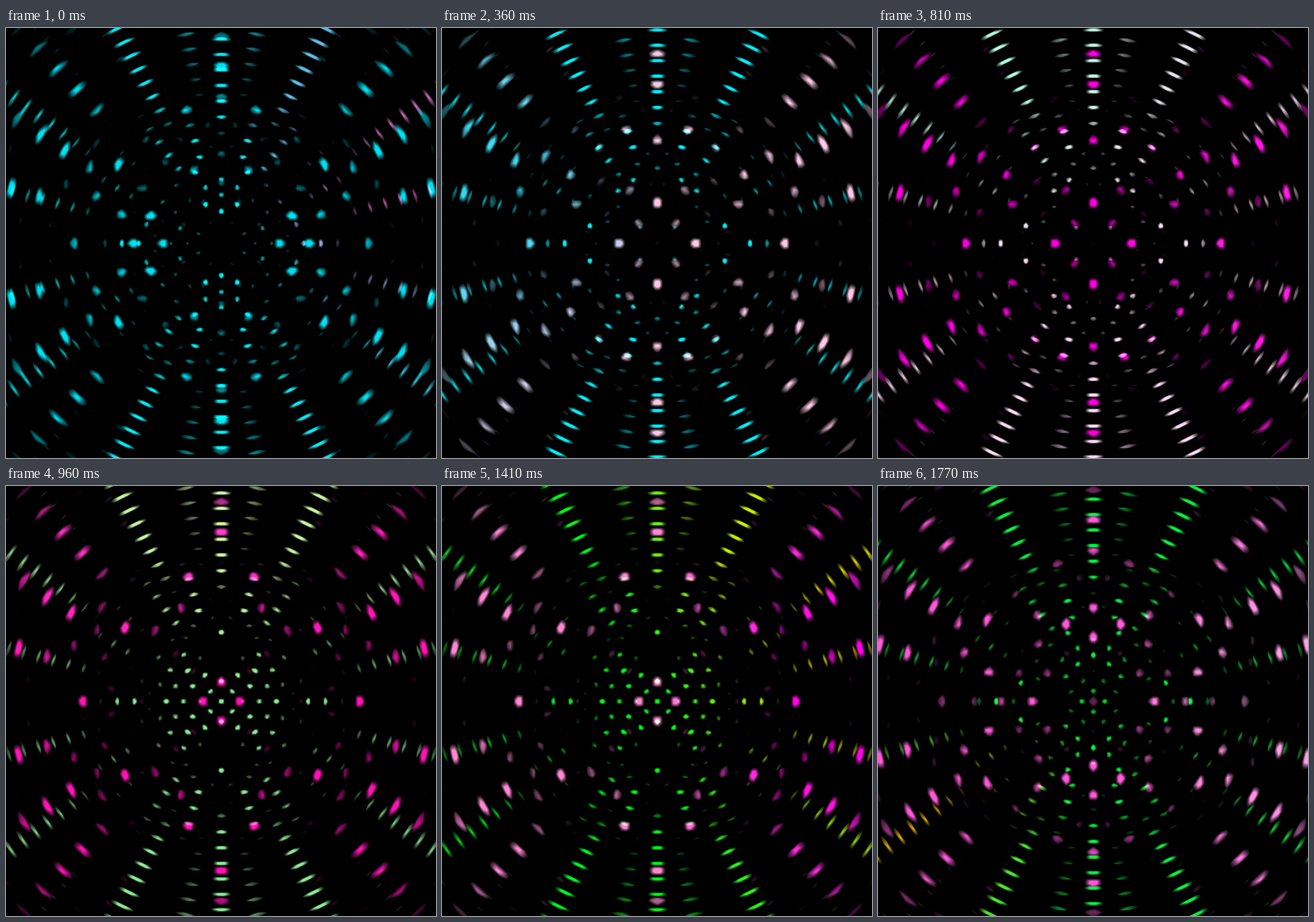
Animation, 600 px wide and 600 px high, one loop 1800 ms. Source, as an HTML page with a canvas:

```html
<!DOCTYPE html>
<html>
<head>
<meta charset="utf-8">
<style>
  html, body { margin: 0; height: 100%; overflow: hidden; background: #000; }
  canvas { display: block; width: 100vw; height: 100vh; }
</style>
</head>
<body>
<canvas id="stage" width="600" height="600"></canvas>
<script>
const SIZE = 600, MID = 300, LOOP = 1800, STEP = 30, PERIOD = 225;
const DARK = 0.22, FULL = 0.56; // ring product mapped to black and to full colour
const ctx = document.getElementById('stage').getContext('2d');
const image = ctx.createImageData(SIZE, SIZE);
const data = image.data;

// Each layer multiplies the rings of four sources at (±a, ±b).
// dir 1 runs inward, -1 outward.
// Keys: time, base colour, accent colour, accent angle, accent narrowness.
const layers = [
  { a: 112.2, b: 105.6, wave: 37.5, dir: 1, phase: 0.86, keys: [
    [0, '00e0f0', '00e0f0', 0, 2],
    [360, 'ffc8e6', '30d8f0', 165, 2],
    [630, '00e6ec', '00e6ec', 90, 2],
    [810, 'ff00e0', 'ff20e0', 0, 2],
    [1140, 'ff2c80', 'ff60b0', 225, 2],
    [1410, 'ff88d4', 'ff00e4', 0, 1],
    [1770, 'ff58d8', 'ffa4e8', 0, 2]] },
  { a: 59.5, b: 65.1, wave: 20.86, dir: -1, phase: 0.975, keys: [
    [0, '00ecf2', 'ff70d0', 20, 3],
    [360, '00f0fa', '00f0fa', 40, 2],
    [630, 'ff9cde', '10d0f0', 58, 0.5],
    [810, 'ffdcf4', 'b0ffe0', 120, 2],
    [1140, '00ff24', 'fff060', 50, 2],
    [1410, '00f41c', 'ffee00', 20, 0.8],
    [1770, '08f040', 'ffc000', 218, 12]] }
];

const rgb = hex => [0, 2, 4].map(i => parseInt(hex.substr(i, 2), 16));
const mix = (p, q, u) => p + (q - p) * u;
const mixRgb = (p, q, u) => p.map((v, i) => mix(v, q[i], u));

// Store each pixel's distance to the four sources, in wavelengths.
function prepare(layer) {
  const rings = layer.rings = new Float32Array(SIZE * SIZE * 4);
  layer.keys.forEach(k => { k[1] = rgb(k[1]); k[2] = rgb(k[2]); });
  let n = 0;
  for (let y = -MID; y < MID; y++) for (let x = -MID; x < MID; x++)
    for (const sx of [-1, 1]) for (const sy of [-1, 1])
      rings[n++] = Math.hypot(x - sx * layer.a, y - sy * layer.b) / layer.wave;
}

function tint(keys, t) {
  let i = keys.length - 1;
  while (keys[i][0] > t) i--;
  const p = keys[i], q = keys[i + 1] || p;
  const u = q === p ? 0 : (t - p[0]) / (q[0] - p[0]);
  const angle = mix(p[3], q[3], u) * Math.PI / 180;
  return { base: mixRgb(p[1], q[1], u), accent: mixRgb(p[2], q[2], u),
           ax: Math.cos(angle), ay: -Math.sin(angle), narrow: mix(p[4], q[4], u) };
}

function drawLayer({ rings, dir, phase, keys }, t) {
  const shift = dir * t / PERIOD - phase;
  const { base, accent, ax, ay, narrow } = tint(keys, t);
  for (let i = 0; i < SIZE * SIZE; i++) {
    let v = 1;
    for (let n = i * 4; n < i * 4 + 4 && v > DARK; n++) {
      const f = rings[n] + shift;
      v *= Math.abs(2 * (f - Math.floor(f)) - 1);
    }
    if (v <= DARK) continue;
    const light = Math.min(1, (v - DARK) / (FULL - DARK));
    const x = i % SIZE - MID, y = Math.floor(i / SIZE) - MID;
    const r = Math.hypot(x, y) || 1;
    const facing = Math.max(0, (x * ax + y * ay) / r);
    const w = Math.pow(facing, narrow) * Math.min(1, r / 200);
    for (let k = 0; k < 3; k++) data[i * 4 + k] += light * mix(base[k], accent[k], w);
  }
}

function render(t) {
  data.fill(0);
  for (let i = 3; i < data.length; i += 4) data[i] = 255;
  layers.forEach(layer => drawLayer(layer, t));
  ctx.putImageData(image, 0, 0);
}

layers.forEach(prepare);
const start = performance.now();
let shown = -1;
function tick() {
  const elapsed = Math.max(0, performance.now() - start);
  const t = Math.floor(elapsed % LOOP / STEP) * STEP;
  if (t !== shown) render(shown = t);
  requestAnimationFrame(tick);
}
tick();
</script>
</body>
</html>
```
